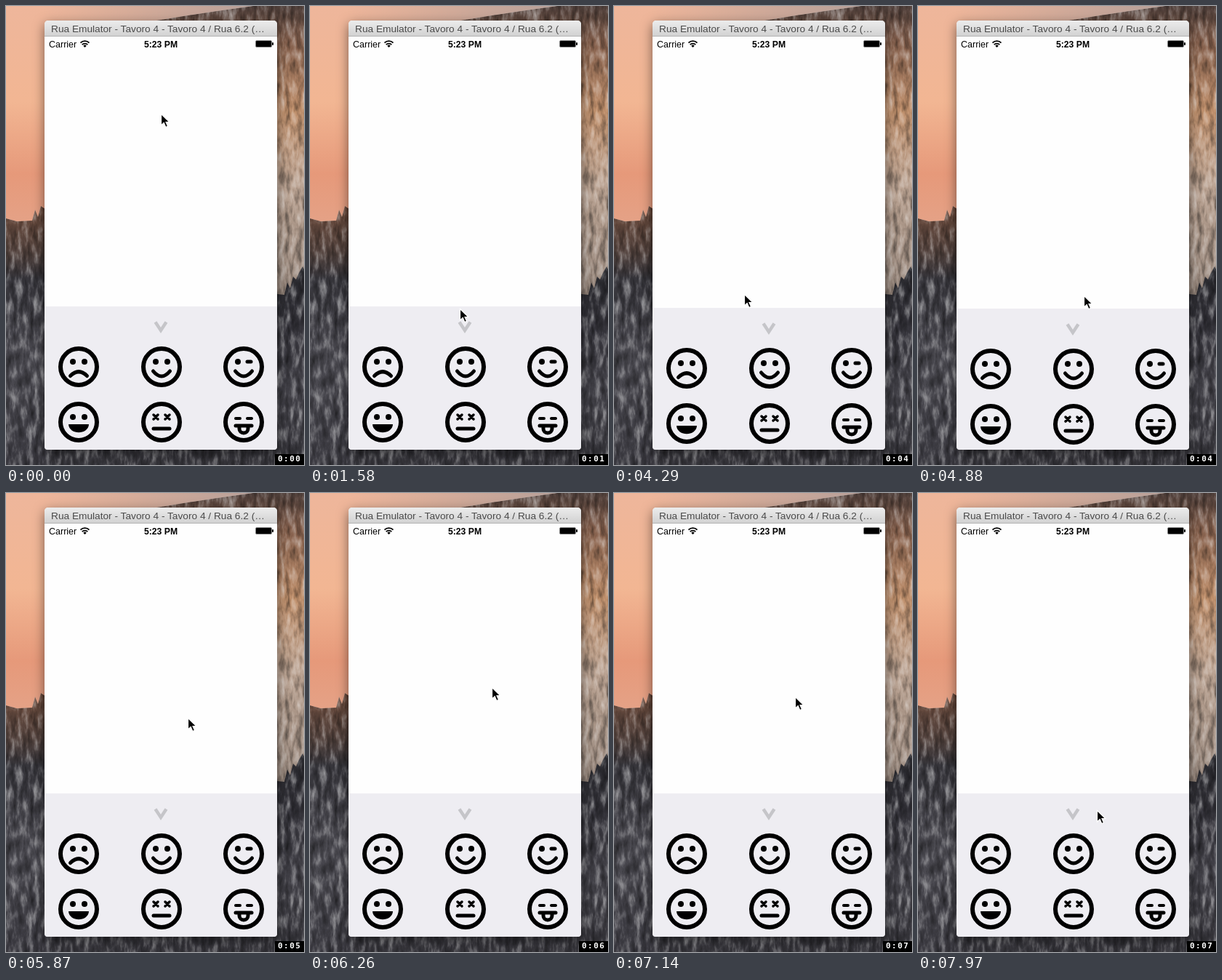
Write an HTML page that moves like this. It is 410 px wide and 631 px high and loops after 8 s.

```html
<!DOCTYPE html>
<html lang="en">
<head>
<meta charset="utf-8">
<title>Emoji panel</title>
<style>
  html, body { margin: 0; width: 100%; height: 100%; overflow: hidden; background: #333; }
  svg { position: absolute; left: 0; top: 0; }
  #live { will-change: transform; }
  text { font-family: "Liberation Sans", Arial, sans-serif; }
  .line { fill: none; stroke: #000; stroke-width: 5; stroke-linecap: round; }
</style>
</head>
<body>
<!-- Static scenery and window -->
<svg width="410" height="631">
  <defs>
    <linearGradient id="sky" x2="0" y2="1">
      <stop offset="0" stop-color="#eeb69b"/><stop offset=".4" stop-color="#f2b693"/>
      <stop offset=".7" stop-color="#e6997a"/><stop offset="1" stop-color="#e4a68c"/>
    </linearGradient>
    <linearGradient id="haze">
      <stop offset="0" stop-color="#a99a98" stop-opacity="0"/><stop offset="1" stop-color="#a99a98"/>
    </linearGradient>
    <linearGradient id="cliff" x2="0" y2="1">
      <stop offset="0" stop-color="#6b4a3b"/><stop offset=".18" stop-color="#54443f"/>
      <stop offset=".28" stop-color="#38373d"/><stop offset=".6" stop-color="#4c4b52"/>
      <stop offset="1" stop-color="#3c3b42"/>
    </linearGradient>
    <linearGradient id="wall" x2="0" y2="1">
      <stop offset="0" stop-color="#50403b"/><stop offset=".12" stop-color="#85604d"/>
      <stop offset=".35" stop-color="#c0906c"/><stop offset=".6" stop-color="#b9a190"/>
      <stop offset="1" stop-color="#94857b"/>
    </linearGradient>
    <linearGradient id="woods" x2="0" y2="1">
      <stop offset="0" stop-color="#29292e"/><stop offset=".3" stop-color="#35343b"/>
      <stop offset=".6" stop-color="#45444b"/><stop offset="1" stop-color="#38373d"/>
    </linearGradient>
    <linearGradient id="bar" x2="0" y2="1">
      <stop offset="0" stop-color="#ececec"/><stop offset="1" stop-color="#d2d2d2"/>
    </linearGradient>
    <filter id="rock" x="0" y="0" width="1" height="1" color-interpolation-filters="sRGB">
      <feTurbulence type="fractalNoise" baseFrequency=".13 .04" numOctaves="4" seed="8"/>
      <feColorMatrix values=".6 0 0 0 .2  .6 0 0 0 .2  .6 0 0 0 .2  0 0 0 0 1" result="grain"/>
      <feBlend in="grain" in2="SourceGraphic" mode="hard-light"/>
      <feComposite in2="SourceGraphic" operator="in"/>
    </filter>
  </defs>
  <rect width="410" height="330" fill="url(#sky)"/>
  <rect x="50" width="360" height="40" fill="url(#haze)"/>
  <g filter="url(#rock)">
    <path fill="url(#wall)" d="M195 22L250 13 290 7 340 0H410V410H195Z"/>
    <path fill="url(#cliff)" d="M0 292L15 296 36 295 40 280 44 290 48 275 70 290V631H0Z"/>
    <path fill="url(#woods)" d="M60 600H373V396L383 397 387 380 391 388 395 372 399 376 403 367 408 358 410 362V631H60Z"/>
  </g>
  <rect x="53" y="20" width="320" height="590" rx="5" fill="#fefefe" style="filter:drop-shadow(0 5px 8px rgba(0,0,0,.5))"/>
  <path d="M53 41V25a5 5 0 0 1 5-5H368a5 5 0 0 1 5 5V41Z" fill="url(#bar)"/>
  <path d="M53 41.5H373" stroke="#b4b4b4"/>
  <text x="62" y="36" font-size="13.7" fill="#4b4b4b">Rua Emulator - Tavoro 4 - Tavoro 4 / Rua 6.2 (…</text>
  <text x="59" y="56.5" font-size="12.5">Carrier</text>
  <text x="213" y="56.5" font-size="12.2" font-weight="bold" text-anchor="middle">5:23 PM</text>
  <path d="M102.5 50.6a8.5 8.5 0 0 1 12 0M104.7 53.2a5.3 5.3 0 0 1 7.6 0" fill="none" stroke="#000" stroke-width="1.8"/>
  <path d="M108.5 57l-2.2-2.2a3 3 0 0 1 4.4 0Z"/>
  <rect x="343.5" y="47.5" width="22" height="9" rx="1.5" stroke="#888"/>
  <rect x="366" y="50" width="2" height="4" rx="1"/>
</svg>

<!-- Moving parts -->
<svg id="live" width="410" height="631">
  <defs>
    <clipPath id="screen"><rect x="53" y="42" width="320" height="568" rx="4"/></clipPath>
    <circle id="ring" r="25" fill="none" stroke="#000" stroke-width="6"/>
    <g id="eyes"><circle cx="-8" cy="-7" r="4"/><circle cx="8" cy="-7" r="4"/></g>
    <path id="smile" class="line" d="M-11.5 6Q0 20 11.5 6"/>
  </defs>
  <g clip-path="url(#screen)">
    <g id="panel">
      <rect x="53" width="320" height="240" fill="#eeedf2"/>
      <path d="M205.5 21.5L213 33 220.5 21.5" fill="none" stroke="#c5c5c9" stroke-width="4.5"/>
      <g transform="translate(100 83)">
        <use href="#ring"/><use href="#eyes"/>
        <path class="line" d="M-11.5 12.5Q0 1 11.5 12.5"/>
      </g>
      <g transform="translate(214 83)">
        <use href="#ring"/><use href="#eyes"/><use href="#smile"/>
      </g>
      <g transform="translate(327 83)">
        <use href="#ring"/><use href="#smile"/>
        <circle cx="-8" cy="-7" r="4"/><path class="line" d="M5 -7H10"/>
      </g>
      <g transform="translate(100 159)">
        <use href="#ring"/><use href="#eyes"/>
        <path d="M-14 3H14C13 18 -13 18 -14 3Z"/>
      </g>
      <g transform="translate(214 159)">
        <use href="#ring"/>
        <path class="line" style="stroke-width:3.5" d="M-11 -10l6 6m0 -6l-6 6M5 -10l6 6m0 -6l-6 6"/>
        <path class="line" d="M-11 9H11"/>
      </g>
      <g transform="translate(327 159)">
        <use href="#ring"/>
        <path class="line" style="stroke-width:4" d="M-11 -5H-5M5 -5H11"/>
        <path class="line" d="M-11 5H11M-6 5V9a6 6 0 0 0 12 0V5"/>
      </g>
    </g>
  </g>
  <g id="cursor">
    <path d="M-.5 -.5V15L3.200 11.500 5.800 17.500 8.500 16.300 6 10.500H10.800Z" stroke="#fff" stroke-width="1.200"/>
  </g>
  <rect x="370" y="616" width="40" height="15"/>
  <text id="clock" x="374" y="626" font-size="11" font-weight="bold" fill="#fff" letter-spacing="1.5" style="font-family:'DejaVu Sans Mono',monospace">0:00</text>
</svg>

<script>
const LOOP = 8000, TICK = 142;       // the screen is refreshed once per tick
const SHOWN = 413, HIDDEN = 610;     // panel top
const HIDE_AT = 2000, SHOW_AT = 3780;

// Pointer trips, in ms
const home = { x: 214, y: 149 };
const trips = [
  { from: 800, to: 1704, x: 206, y: 436 },
  { from: 2000, to: 2550, x: 189, y: 562 },
  { from: 3750, to: 4260, x: 180, y: 397 },
  { from: 4260, to: 4828, x: 229, y: 399 },
  { from: 5590, to: 5820, x: 251, y: 310 },
  { from: 5820, to: 6674, x: 251, y: 227 },
  { from: 6700, to: 7900, x: 247, y: 437 }
];

const byId = id => document.getElementById(id);
const panel = byId("panel"), cursor = byId("cursor"), clock = byId("clock");

const clamp = p => Math.min(1, Math.max(0, p));
const smooth = p => p * p * (3 - 2 * p);
const bump = (t, peak) => Math.exp(-(((t - peak) / 230) ** 2));

// What is left of a critically damped spring's way after t ms
function rest(t, speed) {
  const s = Math.max(0, t) / 1000 * speed;
  return (1 + s) * Math.exp(-s);
}

function pointer(t) {
  return trips.reduce((at, trip) => {
    const p = smooth(clamp((t - trip.from) / (trip.to - trip.from)));
    return { x: at.x + (trip.x - at.x) * p, y: at.y + (trip.y - at.y) * p };
  }, home);
}

function panelTop(t) {
  const away = t < SHOW_AT ? 1 - rest(t - HIDE_AT, 8.3) : rest(t - SHOW_AT, 13.8);
  const sway = 3 * bump(t, 4830) + 6 * bump(t, 6674);
  return SHOWN + (HIDDEN - SHOWN) * away + sway;
}

function draw(now) {
  const time = now % LOOP;
  const t = Math.floor(time / TICK) * TICK;
  const { x, y } = pointer(t);
  cursor.setAttribute("transform", `translate(${Math.round(x)} ${Math.round(y)})`);
  panel.setAttribute("transform", `translate(0 ${Math.round(panelTop(t))})`);
  clock.textContent = "0:0" + Math.floor(time / 1000);
  requestAnimationFrame(draw);
}
requestAnimationFrame(draw);
</script>
</body>
</html>
```
